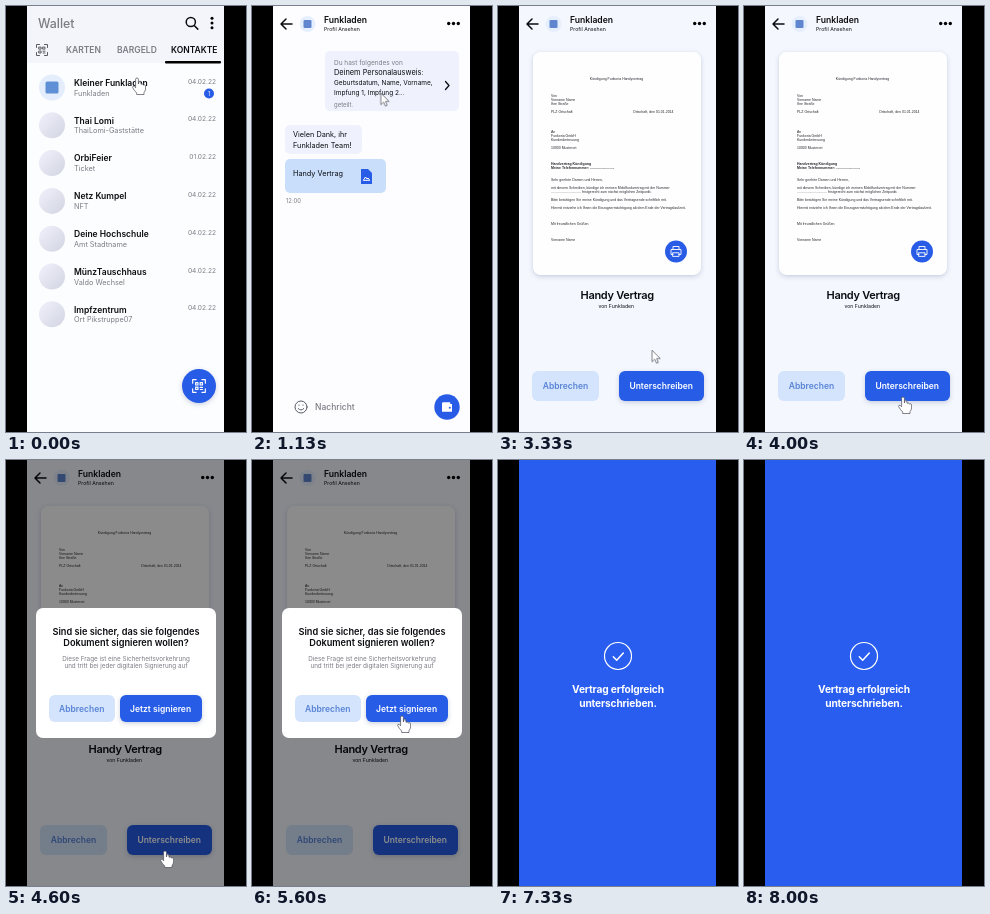
Recreate the animation shown at these times as an HTML page. Size 240 by 426 pixels, loop 8070 ms.

```html
<!DOCTYPE html>
<html lang="de">
<head>
<meta charset="utf-8">
<title>Wallet</title>
<style>
  html, body { margin: 0; width: 100%; height: 100%; overflow: hidden; background: #000; }
  svg { display: block; width: 100vw; height: 100vh; }
  text { font-family: Inter, "Liberation Sans", sans-serif; fill: #0b0c10; }
  .b { font-weight: 600; }
  .m { text-anchor: middle; }
  .e { text-anchor: end; }
  .grey { fill: #7b7c84; }
  .white { fill: #fff; }
  .soft { fill: #5983d6; }
  .line { fill: none; stroke: #0b0c10; stroke-linecap: round; stroke-linejoin: round; }
  .pale { stroke: #fff; }
  .blue { fill: #285ce6; }
  .light { fill: #d3e4fc; }
  .letter text { font: 3.5px "Liberation Sans", Arial, sans-serif; fill: #25262b; }
  .letter .b { font-weight: 700; }

  .anim { animation: 8070ms linear infinite both; }
  #chat { animation-name: chat; }
  #contract { animation-name: contract; }
  #bar { animation-name: bar; }
  #dialog { animation-name: dialog; }
  #success { animation-name: success; }
  #glow { animation-name: glow; }
  #cursor { animation-name: travel; }
  #hand { animation-name: hand; animation-timing-function: step-end; }
  #arrow { animation-name: arrow; animation-timing-function: step-end; }

  @keyframes chat {
    0%, 7.43% { opacity: 0; animation-timing-function: ease-out; }
    11.15%, 100% { opacity: 1; }
  }
  @keyframes contract {
    0%, 26.39% { opacity: 0; }
    30.11%, 100% { opacity: 1; }
  }
  @keyframes bar {
    0%, 7.43% { opacity: 0; animation-timing-function: ease-out; }
    11.15%, 26.39% { opacity: 1; animation-timing-function: ease-in; }
    30.11%, 100% { opacity: 0; }
  }
  @keyframes dialog {
    0%, 51.18% { opacity: 0; animation-timing-function: ease-out; }
    54.89%, 78.5% { opacity: 1; }
    79.93%, 100% { opacity: 0; }
  }
  @keyframes success {
    0%, 79.93% { opacity: 0; animation-timing-function: ease-out; }
    83.28%, 100% { opacity: 1; }
  }
  @keyframes glow {
    0%, 79.93% { opacity: 0; }
    82.2%, 82.9% { opacity: 1; }
    85%, 100% { opacity: 0; }
  }
  @keyframes travel {
    0%, 11.15% { transform: translate(131px, 72px); animation-timing-function: ease-in-out; }
    22.3%, 32.2% { transform: translate(115px, 183px); animation-timing-function: ease-in; }
    41.26% { transform: translate(154px, 344px); animation-timing-function: ease-out; }
    46.5%, 58.9% { transform: translate(159px, 391px); animation-timing-function: ease-in-out; }
    66.3%, 83.4% { transform: translate(150px, 256px); animation-timing-function: ease-in-out; }
    89.8%, 100% { transform: translate(252px, 300px); }
  }
  @keyframes hand {
    0% { opacity: 1; } 12.5% { opacity: 0; }
    20% { opacity: 1; } 33.2% { opacity: 0; }
    43.4% { opacity: 1; } 60.5% { opacity: 0; }
    63.8% { opacity: 1; } 84.8%, 100% { opacity: 0; }
  }
  @keyframes arrow {
    0% { opacity: 0; } 12.5% { opacity: 1; }
    20% { opacity: 0; } 33.2% { opacity: 1; }
    43.4% { opacity: 0; } 60.5% { opacity: 1; }
    63.8% { opacity: 0; } 84.8%, 100% { opacity: 1; }
  }
</style>
</head>
<body>
<svg viewBox="0 0 240 426" preserveAspectRatio="none">
  <defs>
    <clipPath id="phone"><rect x="21" width="197" height="426"/></clipPath>
    <linearGradient id="ball" x1="0" y1="0" x2="1" y2="1">
      <stop offset="0" stop-color="#f0f1fb"/><stop offset="1" stop-color="#d2d4e2"/>
    </linearGradient>
    <filter id="shade" x="-20%" y="-20%" width="140%" height="150%">
      <feDropShadow dx="0" dy="1.5" stdDeviation="2" flood-color="#33457a" flood-opacity=".25"/>
    </filter>
    <g id="scan" class="line">
      <path d="M-5.5-2.5v-3h3M2.5-5.5h3v3M5.5 2.5v3h-3M-2.5 5.5h-3v-3"/>
      <path d="M-2.9-2.9h2v2h-2zM1-2.9h2v2h-2zM-2.9 1h2v2h-2zM1 1.2h2M1.2 3h1.8"/>
    </g>
    <g id="head">
      <path class="line" stroke-width="1.5" d="M40 18H29.5M34 13l-5 5 5 5"/>
      <circle cx="55.5" cy="18" r="8" fill="#e6effd"/>
      <rect x="51.5" y="14" width="8" height="8" rx="1" fill="#5f86cf"/>
      <text class="b" x="72" y="17" font-size="8.6">Funkladen</text>
      <text x="72" y="25" font-size="5.2">Profil Ansehen</text>
      <circle cx="196.7" cy="17.5" r="1.7"/><circle cx="201.5" cy="17.5" r="1.7"/><circle cx="206.3" cy="17.5" r="1.7"/>
    </g>
  </defs>

  <g clip-path="url(#phone)">
    <g id="contacts">
      <rect x="21" width="197" height="426" fill="#fcfdff"/>
      <rect x="21" width="197" height="57" fill="#f3f5fb"/>
      <text x="32" y="22" font-size="12.4" font-weight="500" class="grey">Wallet</text>
      <g class="line" stroke-width="1.5"><circle cx="184.8" cy="16" r="4.6"/><path d="M188.2 19.5l3.6 3.6"/></g>
      <circle cx="206" cy="12.3" r="1.5"/><circle cx="206" cy="17" r="1.5"/><circle cx="206" cy="21.7" r="1.5"/>
      <use href="#scan" x="36" y="44" opacity=".65"/>
      <g font-size="8.5" font-weight="600">
        <text class="grey" x="60" y="47">KARTEN</text>
        <text class="grey" x="111" y="47">BARGELD</text>
        <text x="165" y="47">KONTAKTE</text>
      </g>
      <rect x="159" y="55" width="56" height="2.4" rx="1"/>
      <g id="rows"></g>
      <circle class="blue" cx="203" cy="87.5" r="5"/>
      <text class="m white" x="203" y="89.5" font-size="5.5">1</text>
      <circle class="blue" cx="193" cy="380" r="17" filter="url(#shade)"/>
      <g transform="translate(193 380) scale(1.15)" id="scanFab"></g>
    </g>

    <g id="chat" class="anim">
      <rect x="21" width="197" height="426" fill="#fdfdff"/>
      <use href="#head"/>
      <rect x="73" y="45" width="134" height="60" rx="5" fill="#eff2fc"/>
      <g font-size="6.5">
        <text class="grey" x="82" y="58.5">Du hast folgendes von</text>
        <text x="82" y="69" font-size="7.4">Deinem Personalausweis:</text>
        <text x="82" y="78.5">Geburtsdatum, Name, Vorname,</text>
        <text x="82" y="88.5">Impfung 1, Impfung 2...</text>
        <text class="grey" x="82" y="101" font-size="6">geteilt.</text>
      </g>
      <path class="line" stroke-width="1.3" d="M193.5 75.5l3.5 4-3.5 4"/>
      <rect x="33" y="119" width="77" height="29" rx="5" fill="#eff2fc"/>
      <g font-size="7.3">
        <text x="41" y="131">Vielen Dank, ihr</text>
        <text x="41" y="141.5">Funkladen Team!</text>
        <rect x="33" y="153" width="101" height="34" rx="5" fill="#c8defb"/>
        <text x="41" y="169.5">Handy Vertrag</text>
      </g>
      <path class="blue" d="M109 163h7l4 4v11h-11z"/>
      <path class="line pale" d="M111.5 174l2-3 1.5 2 1-1 1.5 2z"/>
      <text class="grey" x="34" y="196.5" font-size="5.8">12:00</text>
    </g>

    <g id="contract" class="anim">
      <rect x="21" width="197" height="426" fill="#f5f7fe"/>
      <use href="#head"/>
      <rect x="35" y="46" width="168" height="223" rx="8" fill="#fefeff" filter="url(#shade)"/>
      <g class="letter" id="letter"></g>
      <circle class="blue" cx="178" cy="245.5" r="11"/>
      <g class="line pale" stroke-width=".9">
        <path d="M175 243.5v-3h6v3M175 248.5h-2v-5h10v5h-2"/><path d="M175 246.8h6v3.6h-6z"/>
      </g>
      <text class="b m" x="119.2" y="293" font-size="11" letter-spacing="-.3">Handy Vertrag</text>
      <text class="m" x="118.3" y="301.5" font-size="5.2">von Funkladen</text>
      <rect class="light" x="34" y="365" width="67" height="30" rx="6"/>
      <rect class="blue" x="121" y="365" width="85" height="30" rx="6" filter="url(#shade)"/>
      <g class="b m" font-size="8.5">
        <text class="soft" x="67.5" y="383">Abbrechen</text>
        <text class="white" x="163.2" y="383">Unterschreiben</text>
      </g>
    </g>

    <g id="bar" class="anim">
      <g class="line" style="stroke: #555964">
        <circle cx="49" cy="401" r="6"/><path d="M46.2 402.5q2.8 3.2 5.6 0M47 399v.3M51 399v.3"/>
      </g>
      <text class="grey" x="63" y="404" font-size="8.5" font-weight="500">Nachricht</text>
      <circle class="blue" cx="195" cy="401" r="12.7"/>
      <path class="white" d="M190 397.5q0-1.2 1.2-1.2h7v1.7h1.8v7.7h-10z"/>
      <circle class="blue" cx="197.8" cy="401.8" r="1"/>
    </g>

    <g id="dialog" class="anim">
      <rect x="21" width="197" height="426" fill-opacity=".45"/>
      <rect x="30" y="148" width="180" height="130" rx="7" fill="#fff"/>
      <g class="b m" font-size="9.2">
        <text x="120" y="174.5">Sind sie sicher, das sie folgendes</text>
        <text x="120" y="186">Dokument signieren wollen?</text>
      </g>
      <g class="m" font-size="6.3">
        <text x="120" y="200.7" class="grey">Diese Frage ist eine Sicherheitsvorkehrung</text>
        <text x="120" y="208.4" class="grey">und tritt bei jeder digitalen Signierung auf</text>
      </g>
      <rect class="light" x="43" y="235" width="66" height="27" rx="6"/>
      <rect class="blue" x="114" y="235" width="82" height="27" rx="6" filter="url(#shade)"/>
      <g class="b m" font-size="8.5">
        <text class="soft" x="75.7" y="251.6">Abbrechen</text>
        <text class="white" x="154.6" y="251.6">Jetzt signieren</text>
      </g>
    </g>

    <rect id="success" class="anim" x="21" width="197" height="426" fill="#295df0"/>
    <!-- traces of the page that linger while the blue settles -->
    <g id="glow" class="anim">
      <rect x="21" width="197" height="33" fill="#20203c" fill-opacity=".27"/>
      <rect x="36" y="47" width="166" height="221" rx="7" fill="#fff" fill-opacity=".09"/>
      <rect x="36" y="366" width="64" height="28" rx="5" fill="#fff" fill-opacity=".09"/>
      <circle cx="120" cy="196" r="13.5" fill="#20203c" fill-opacity=".22"/>
    </g>
    <g class="anim" style="animation-name: success">
      <g class="line pale" stroke-width="1.2"><circle cx="120" cy="196" r="13.5"/><path stroke-width="1.5" d="M115.3 196.8l3.4 3.4 6.6-7.2"/></g>
      <g class="m" font-size="10.2" font-weight="700" letter-spacing="-.15">
        <text class="white" x="120" y="232.5">Vertrag erfolgreich</text>
        <text class="white" x="120" y="246.7">unterschrieben.</text>
      </g>
    </g>
  </g>

  <g id="cursor" class="anim" fill="#fff" stroke="#4b4d57" stroke-width=".7" stroke-linejoin="round">
    <path id="hand" class="anim" d="M-1.4 1.2Q-1.4 0 0 0T1.4 1.2V6Q3-.1 4 5.6V6.3Q5.6 5 6.3 7.1Q8.8 6 8.6 9V11Q8.4 13 7 14.6V16.5H-.3V15Q-2.6 13-4.4 9.5Q-4.3 7.5-2.8 8.3L-1.4 9.8Z"/>
    <path id="arrow" class="anim" d="M0 0V11.5L2.7 9 4.5 13 6.3 12.2 4.6 8.3H8.2Z"/>
  </g>
</svg>
<script>
  const byId = id => document.getElementById(id);
  const text = (x, y, size, cls, str) => `<text x="${x}" y="${y}" font-size="${size}" class="${cls}">${str}</text>`;

  const contacts = [
    ["Kleiner Funkladen", "Funkladen"],
    ["Thai Lomi", "ThaiLomi-Gaststätte"],
    ["OrbiFeier", "Ticket", "01.02.22"],
    ["Netz Kumpel", "NFT"],
    ["Deine Hochschule", "Amt Stadtname"],
    ["MünzTauschhaus", "Valdo Wechsel"],
    ["Impfzentrum", "Ort Pikstruppe07"]
  ];
  byId("rows").innerHTML = contacts.map(([name, sub, date = "04.02.22"], i) => {
    const y = 81.5 + i * 37.8;
    const face = i
      ? `<circle cx="46" cy="${y}" r="13" fill="url(#ball)"/>`
      : `<circle cx="46" cy="${y}" r="13" fill="#e3edfc"/><rect x="39.5" y="${y - 6}" width="13" height="12" rx="1.5" fill="#5f8fd4"/>`;
    return face + text(68, y - 1.8, 8.5, "b", name) + text(68, y + 8, 7.3, "grey", sub)
      + text(210, y - 4, 6.6, "e grey", date);
  }).join("");

  byId("scanFab").innerHTML = byId("scan").innerHTML;
  byId("scanFab").classList.add("line", "pale");

  const letter = [
    [73, "Kündigung Funkoria Handyvertrag", "m", 118.5],
    [89.5, "Von"], [93.5, "Vorname Name"], [97.5, "Ihre Straße"],
    [105.5, "PLZ Ortschaft"], [105.5, "Ortschaft, den 01.01.2014", "", 135],
    [125.5, "An"], [129.5, "Funkoria GmbH"], [133.5, "Kundenbetreuung"], [141.5, "10000 Musterort"],
    [157.5, "Handvertrag Kündigung", "b"], [161.5, "Meine Telefonnummer: .........................", "b"],
    [173.5, "Sehr geehrte Damen und Herren,"],
    [181.5, "mit diesem Schreiben, kündige ich meinen Mobilfunkvertrag mit der Nummer"],
    [185.5, "............................... fristgerecht zum nächst möglichen Zeitpunkt."],
    [193.5, "Bitte bestätigen Sie meine Kündigung und das Vertragsende schriftlich mit."],
    [201.5, "Hiermit entziehe ich Ihnen die Einzugsermächtigung ab dem Ende der Vertragslaufzeit."],
    [217.5, "Mit freundlichen Grüßen"], [233.5, "Vorname Name"]
  ];
  byId("letter").innerHTML = letter.map(([y, str, cls = "", x = 53]) => text(x, y + 1.2, 3.5, cls, str)).join("");
</script>
</body>
</html>
```
